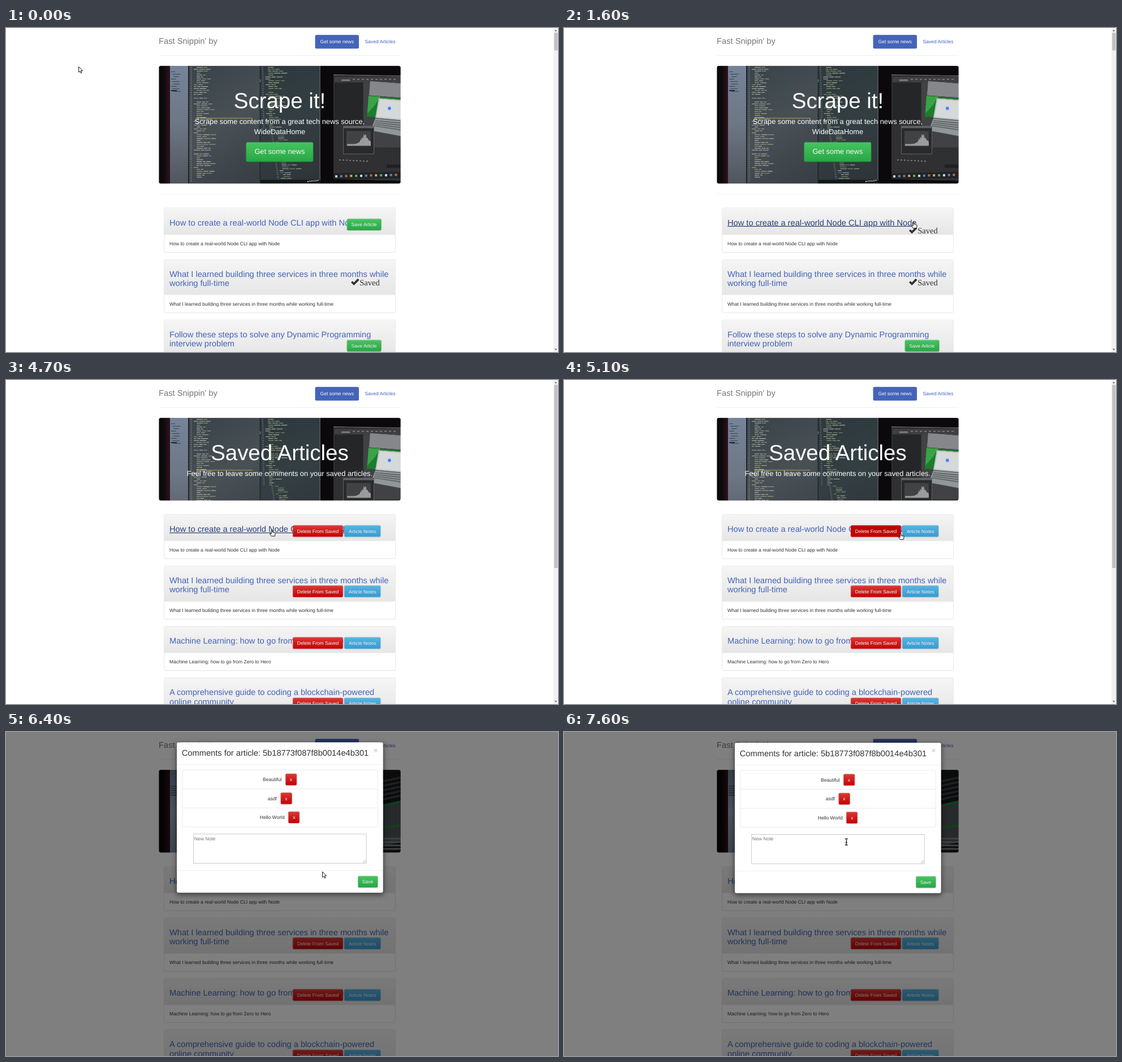
An HTML page with a canvas for the animation above (8000 ms loop, 976 by 574 pixels).

```html
<!DOCTYPE html>
<html lang="en">
<head>
<meta charset="utf-8">
<title>Article scraper</title>
<style>
* { box-sizing: border-box; }
html, body { margin: 0; width: 100%; height: 100%; overflow: hidden; background: #fff; }
body { position: relative; text-rendering: geometricPrecision; }
#screen { position: absolute; left: 0; top: 0; width: 1600px; height: 941px; overflow: hidden;
  transform: scale(.61); transform-origin: 0 0;
  font: 14px/20px "Liberation Sans", Arial, sans-serif; color: #333; }
.page { position: absolute; left: 442.8px; top: 20px; width: 701px; }
h1, h3, p { margin: 0; font-weight: 400; white-space: nowrap; }
.header { position: relative; height: 60px; border-bottom: 1px solid #e5e5e5; margin-bottom: 30px; }
.header h3 { font-size: 24px; line-height: 37px; color: #777; }
.nav { position: absolute; right: 0; top: 0; display: flex; gap: 2px; color: #4363b7; }
.nav span { padding: 10px 15px; border-radius: 4px; white-space: nowrap; }
.nav .active { background: #4464b9; color: #fff; }
.hero { position: relative; padding: 48px 0; border-radius: 6px; overflow: hidden; color: #fff; text-align: center; }
.hero canvas { position: absolute; left: 0; top: 0; width: 701px; height: 342px; }
.hero > :not(canvas) { position: relative; }
.hero h1 { margin: 20px 0 10px; font-size: 63px; line-height: 69.3px; }
.hero p { margin-bottom: 15px; font-size: 21px; line-height: 29.4px; }
hr { margin: 30px 0 -1px; border: 0; height: 1px; background: #eee; }
.list { padding: 40px 15px 0; }
.panel { position: relative; margin-bottom: 20px; border: 1px solid #ddd; border-radius: 4px; background: #fff;
  box-shadow: 0 1px 2px rgba(0,0,0,.05); }
.head { padding: 30px 15px 20px; border-bottom: 1px solid #ddd; border-radius: 3px 3px 0 0;
  background: linear-gradient(#f5f5f5, #e6e6e6); }
.head h3 { font-size: 24px; line-height: 26.4px; color: #4363b7; }
.head h3.hot { color: #2c4179; text-decoration: underline; }
.panel p { padding: 15px; }
.tools { position: absolute; display: flex; gap: 3px; }
.saved { position: absolute; left: 541.5px; top: 55px; padding-left: 24.5px; font: 24px/24px "Liberation Serif", serif; }
.saved svg { position: absolute; left: 0; top: -2px; }
.btn { display: inline-block; padding: 6px 12px; border: 1px solid var(--line); border-radius: 4px; color: #fff;
  background: linear-gradient(var(--top), var(--low)); white-space: nowrap;
  text-shadow: 0 -1px 0 rgba(0,0,0,.2); box-shadow: inset 0 1px 0 rgba(255,255,255,.15), 0 1px 1px rgba(0,0,0,.075); }
.btn.hot { background: var(--low); }
.green { --top: #45c45e; --low: #28a745; --line: #259b40; }
.red { --top: #dc3733; --low: #c20303; --line: #b00404; }
.blue { --top: #54b4e2; --low: #399bd0; --line: #3695c9; }
.big { display: block; width: fit-content; margin: 0 auto 15px; padding: 14px 24px; font-size: 21px; line-height: 28px; border-radius: 6px; }
#bar { position: absolute; right: 0; top: 0; width: 13px; height: 941px; background: #f1f1f1; }
#thumb { position: absolute; left: 2px; top: 14px; width: 10px; background: #c1c1c1; }
#bar svg { position: absolute; left: 0; top: 0; }
#shade { position: absolute; inset: 0; background: rgba(0,0,0,.5); }
#modal { position: absolute; left: 493.5px; top: 30px; width: 600px; border: 1px solid rgba(0,0,0,.2); border-radius: 6px;
  background: #fff; background-clip: padding-box; box-shadow: 0 5px 15px rgba(0,0,0,.5); }
.title { height: 65.3px; padding: 15px; border-bottom: 1px solid #e5e5e5; font-size: 24px; line-height: 34.3px; white-space: nowrap; }
.close { position: absolute; right: 15px; top: 13px; font: bold 21px/21px "Liberation Sans", Arial, sans-serif; opacity: .2; color: #000; }
.notes { margin: 15px 15px 20px; border: 1px solid #ddd; border-radius: 4px; text-align: center; }
.notes div { height: 55px; padding: 10px; line-height: 32px; border-bottom: 1px solid #ddd; }
.notes div:last-child { height: 54px; border: 0; }
.notes .btn { margin-left: 10.7px; line-height: 20px; }
.field { position: relative; width: 502px; height: 86px; margin: 0 auto 20px; border: 1px solid #a9a9a9; padding: 2px; color: #757575; }
.field svg { position: absolute; right: 1px; bottom: 1px; }
.foot { padding: 15px; border-top: 1px solid #e5e5e5; text-align: right; height: 65px; }
#cursor { position: absolute; left: 0; top: 0; }
</style>
</head>
<body>
<div id="screen">
  <div id="news" class="page"></div>
  <div id="kept" class="page"></div>
  <div id="bar"><div id="thumb"></div>
    <svg width="13" height="941" fill="#555"><path d="M3 9l3.5-4L10 9zM3 932l3.5 4 3.5-4z"/></svg></div>
  <div id="shade"></div>
  <div id="modal">
    <div class="title">Comments for article: 5b18773f087f8b0014e4b301</div>
    <span class="close">×</span>
    <div class="notes"></div>
    <div class="field">New Note
      <svg width="10" height="10" stroke="#777"><path d="M1 10L10 1M6 10l4-4"/></svg></div>
    <div class="foot"><span class="btn green">Save</span></div>
  </div>
</div>
<svg id="cursor" width="976" height="574">
  <g stroke="#000" stroke-linejoin="round" fill="#fff">
    <path id="arrow" stroke-width=".9" d="M.6.6V10.4L2.8 8.4 4.4 11.9 6 11.2 4.5 7.8H7.5Z"/>
    <path id="hand" stroke-width=".9" d="M-.9.9Q0-.1.9.9V4.6L5.2 5.5Q6.3 5.9 6.1 7L5.4 11.6H-.7L-3.3 8Q-3.8 6.6-2.4 6.8L-.9 8Z"/>
    <path id="beam" fill="none" stroke="#333" stroke-width="1.5" d="M-2.5-5.5H2.5M0-5.5V5.5M-2.5 5.5H2.5M-1.6 1H1.6"/>
  </g>
</svg>
<script>
const $ = id => document.getElementById(id);
const LOOP = 8000, SAVE = 1000, SWITCH = 4700, OPEN = 6400, SETTLE = 6600;

const node = 'How to create a real-world Node CLI app with Node';
const services = 'What I learned building three services in three months while|working full-time';
const steps = 'Follow these steps to solve any Dynamic Programming|interview problem';
const learning = 'Machine Learning: how to go from Zero to Hero';
const chain = 'A comprehensive guide to coding a blockchain-powered|online community';

const btn = (kind, label) => `<span class="btn ${kind}">${label}</span>`;
const tick = `<span class="saved"><svg width="24" height="24" fill="#333"><path d="M0 13l4-4 4.5 4 11-11.5L24 6 8.5 21.5z"/></svg>Saved</span>`;

function tools(title, right, html) {
  const top = title.includes('|') ? 57.2 : 30.8;
  return `<div class="tools" style="top:${top}px;right:${right}px">${html}</div>`;
}
const panel = (title, extra) => `<div class="panel"><div class="head"><h3>${title.replace('|', '<br>')}</h3></div>
  <p>${title.replace('|', ' ')}</p>${extra}</div>`;
const save = title => panel(title, tools(title, 40, btn('green', 'Save Article')));
const keep = title => panel(title, tools(title, 42, btn('red', 'Delete From Saved') + btn('blue', 'Article Notes')));
const page = (hero, list) => `<div class="header"><h3>Fast Snippin' by</h3>
  <div class="nav"><span class="active">Get some news</span><span>Saved Articles</span></div></div>
  <div class="hero"><canvas width="856" height="416"></canvas>${hero}</div>${list}`;

$('news').innerHTML = page(`<h1>Scrape it!</h1>
  <p>Scrape some content from a great tech news source,<br>WideDataHome</p>${btn('green big', 'Get some news')}`,
  `<hr><div class="list">${save(node)}${panel(services, tick)}${save(steps)}</div>`);
$('news').querySelector('.panel').insertAdjacentHTML('beforeend', tick);
$('kept').innerHTML = page(`<h1>Saved Articles</h1>
  <p>Feel free to leave some comments on your saved articles.</p>`,
  `<div class="list">${[node, services, learning, chain].map(keep).join('')}</div>`);
document.querySelector('.notes').innerHTML =
  ['Beautiful', 'asdf', 'Hello World'].map(s => `<div>${s}${btn('red', 'x')}</div>`).join('');

// Desk with two monitors, drawn in a 428 x 208 space
function photo(canvas, close) {
  const c = canvas.getContext('2d');
  let seed = 7;
  const rnd = () => (seed = seed * 16807 % 2147483647) / 2147483647;
  const rect = (color, x, y, w, h) => { c.fillStyle = color; c.fillRect(x, y, w, h); };
  const poly = (color, ...p) => {
    c.fillStyle = color;
    c.beginPath();
    for (let i = 0; i < p.length; i += 2) c.lineTo(p[i], p[i + 1]);
    c.fill();
  };
  const fade = (x0, y0, x1, y1, ...colors) => {
    const g = c.createLinearGradient(x0, y0, x1, y1);
    colors.forEach((k, i) => g.addColorStop(i / (colors.length - 1), k));
    return g;
  };
  const code = (x, y0, y1, slant, tints) => {
    for (let y = y0; y < y1; y += 3.4) {
      const left = x + slant * y;
      c.globalAlpha = .35;
      rect('#c9d0d0', left, y, 3, 1.2);
      c.globalAlpha = .65;
      if (rnd() < .12) continue;
      let at = left + (rnd() < .3 ? 6 : 11);
      for (let n = 1 + rnd() * 3 | 0; n--;) {
        const w = 4 + rnd() * 8;
        rect(tints[rnd() * tints.length | 0], at, y, w, 1.2);
        at += w + 1.5;
      }
    }
    c.globalAlpha = 1;
  };

  c.setTransform(2, 0, 0, 2, 0, 0);
  rect('#0b090b', 0, 0, 428, 208);
  rect(fade(8, 0, 20, 0, '#0b090b', '#31131d'), 8, 0, 12, 208);
  rect(fade(0, 0, 0, 208, '#76849a', '#6d7784', '#50565d'), 20, 0, 33, 208);
  rect(fade(53, 0, 178, 208, '#394349', '#495156', '#373e43'), 53, 0, 126, 208);
  rect(fade(180, 0, 286, 208, '#2d393e', '#343f43', '#2d3437'), 180, 0, 106, 208);
  rect('#1c2326', 178.5, 0, 1.5, 208);
  rect('#78828a', 179, 24, 1, 5);
  rect('#15181a', 52, 0, 1.2, 208);
  for (let i = 0; i < 9; i++) rect('#39434f', 22 + i % 3 * 2, 10 + i * 4.3, 7 + rnd() * 8, 1);
  rect('#20252c', 22, 43, 10, 2);
  code(56, 2, 205, 0, ['#d8d8cc', '#c9c48f', '#b3bf98', '#dfe4df']);
  code(182, 2, 120, .02, ['#cfcb82', '#9fbf78', '#d9dfd9']);
  code(182, 120, 200, .14, ['#d9dfd9', '#a9b98a', '#8b9a60']);
  rect('#b5a45a', 66, 92, 100, .9);
  rect('#14181a', 180, 201, 106, 7);
  for (let i = 0; i < 6; i++) rect('#c5cbd0', 263 + i * 3.5, 203 - i * .3, 2, 2);
  rect('#596064', 284.5, 0, 1.2, 202);

  // Right monitor: dark editor window holding a picture of a laptop
  poly('#303032', 309, 15, 428, 17, 428, 203, 309, 200);
  poly('#5a5b5d', 309, 15, 428, 17, 428, 18.5, 309, 16.5);
  rect('#3e3f41', 311, 20, 117, 9);
  rect('#77787a', 323, 24, 15, 3);
  for (let i = 0; i < 10; i++) rect('#747577', 343 + i * 8, 23, 4, 1.5);
  rect('#252628', 311, 30, 50, 72);
  rect('#414244', 362, 29, 66, 115);
  poly('#85878a', 374, 27, 428, 31, 428, 56, 372, 52);
  poly('#1d7c2c', 371, 53, 428, 57, 428, 92, 368, 90);
  poly('#38a347', 371, 53, 392, 54, 382, 70, 369, 84);
  poly('#b9bec0', 389, 57, 428, 60, 428, 96, 383, 92);
  poly('#d5d9d9', 391, 59, 428, 62, 428, 94, 385, 90);
  c.fillStyle = '#4285f4';
  c.beginPath();
  c.arc(408, 75, 3, 0, 7);
  c.fill();
  poly('#919698', 383, 93, 428, 97, 428, 124, 375, 114);
  for (let i = 0; i < 4; i++) poly('#5f6467', 384 - i, 96 + i * 3, 428, 100 + i * 4, 428, 102 + i * 4, 383 - i, 97.5 + i * 3);
  rect('#606264', 326, 106, 55, 50);
  rect('#292a2c', 327, 110, 53, 45);
  rect('#414244', 332, 115, 43, 27);
  c.fillStyle = '#9a9b9d';
  for (let i = 0; i < 42; i++) {
    const h = 3 + 18 * Math.exp(-((i - 31) ** 2) / 80) * (.6 + rnd() * .4);
    c.fillRect(333 + i, 141 - h, 1, h);
  }
  for (let i = 0; i < 9; i++) rect('#77797b', 319 + i * 6, 165 + i * .3, 3, 2);
  rect('#1f2021', 403, 174, 25, 6);
  poly('#202326', 309, 190, 428, 187, 428, 198, 309, 200);
  const icons = ['#d3d3d3', '#4c8ac0', '#b56a44', '#bfac5a', '#60a970'];
  for (let i = 0; i < 13; i++) rect(icons[i % 5], 312 + i * 8.8, 193 - i * .2, 4, 4);

  if (close) {
    rect(fade(20, 0, 20, 146, '#6e8095', '#9aaaba', '#7e8c99'), 20, 0, 33, 146);
    for (let i = 0; i < 5; i++) rect('#53616f', 21, 28 + i * 4, 12, 1.5);
    rect('#19191b', 397, 0, 31, 146);
    for (let i = 0; i < 5; i++) poly('#3d4042', 397, 18 + i * 8, 428, 12 + i * 8, 428, 15 + i * 8, 397, 22 + i * 8);
    poly('#4f5557', 397, 64, 428, 57, 428, 128, 397, 134);
    poly('#1e8038', 397, 61, 428, 54, 428, 58, 397, 65);
    poly('#1e8038', 397, 100, 428, 96, 428, 100, 397, 104);
    for (let i = 0; i < 4; i++) rect('#7c8183', 397, 120 + i * 6, 31, 3);
  }
}

// time, x, y, shape, glide from the previous point
const path = [
  [0, 128, 68, 'arrow'], [500, 588, 383, 'arrow', 1], [600, 628, 360, 'arrow'],
  [700, 633, 353, 'hand'], [800, 630, 348, 'hand'], [1000, 630, 348, 'arrow'],
  [1500, 628, 347, 'arrow'], [1600, 618, 343, 'hand'], [1700, 613, 340, 'hand'],
  [2300, 624, 160, 'arrow', 1], [2400, 637, 120, 'arrow'],
  [4700, 470, 265, 'hand'], [4900, 527, 270, 'hand'], [5100, 595, 271, 'hand'],
  [5400, 652, 264, 'hand'], [5600, 634, 266, 'hand'], [6400, 559, 247, 'arrow'],
  [6600, 509, 208.5, 'beam'], [6900, 500, 208.5, 'beam'], [7100, 498, 209, 'beam'], [7600, 499.3, 194.8, 'beam']
];

function pointer(t) {
  const i = path.findLastIndex(k => k[0] <= t);
  const a = path[i], b = path[i + 1];
  if (!b || !b[4]) return a.slice(1);
  const f = (t - a[0]) / (b[0] - a[0]);
  return [a[1] + (b[1] - a[1]) * f, a[2] + (b[2] - a[2]) * f, b[3]];
}

const find = (id, sel) => $(id).querySelector(sel);
const show = (el, on) => { el.style.display = on ? '' : 'none'; };
const newsTitle = find('news', '.head h3'), saveTools = find('news', '.tools'), saveBtn = find('news', '.tools .btn');
const newsTick = find('news', '.saved'), keptTitle = find('kept', '.head h3');
const del = find('kept', '.red'), notes = find('kept', '.blue');
const keptPhoto = find('kept', 'canvas');
photo(find('news', 'canvas'));
let near = null;

function draw(now) {
  const t = Math.floor(now % LOOP / 100) * 100;
  const hot = (el, a, b) => el.classList.toggle('hot', t >= a && t < b);
  const kept = t >= SWITCH, open = t >= OPEN;

  show($('news'), !kept);
  show($('kept'), kept);
  show(saveTools, t < SAVE);
  show(newsTick, t >= SAVE);
  show($('bar'), !open);
  show($('shade'), open);
  show($('modal'), open);
  $('thumb').style.height = (kept ? 532 : 51) + 'px';
  $('modal').style.top = (t < SETTLE ? 28.6 : 30) + 'px';
  if (open !== near) photo(keptPhoto, near = open);

  hot(saveBtn, 700, SAVE);
  hot(newsTitle, 1600, 1800);
  hot(keptTitle, SWITCH, 4900);
  hot(del, 4900, 5400);
  hot(notes, 5400, OPEN);

  const [x, y, shape] = pointer(t);
  for (const id of ['arrow', 'hand', 'beam']) {
    show($(id), id === shape);
    $(id).setAttribute('transform', `translate(${x} ${y})`);
  }
}

const start = performance.now();
(function frame() {
  draw(performance.now() - start);
  requestAnimationFrame(frame);
})();
</script>
</body>
</html>
```
